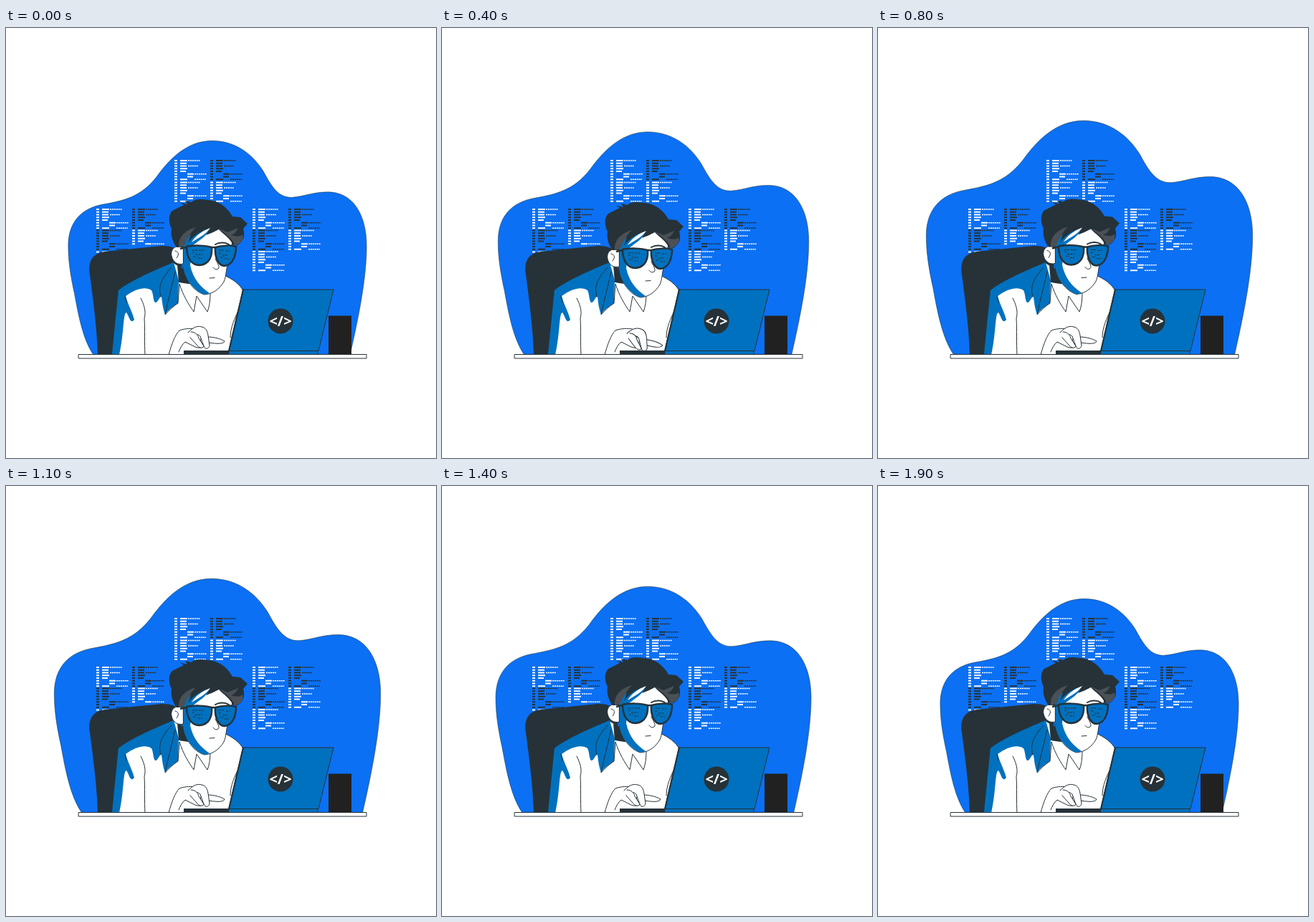
Animation, 600 px wide and 600 px high, one loop 2000 ms. Source, as an HTML page:

```html
<!DOCTYPE html>
<html lang="en">
<head>
<meta charset="utf-8">
<title>Coder at a laptop</title>
<style>
  html, body { margin: 0; width: 100%; height: 100%; overflow: hidden; background: #fff; }
  svg { display: block; width: 100%; height: 100%; }
  .dark { fill: #263238; }
  .blue { fill: #0071bf; }
  .white { fill: #fff; }
  .line { fill: none; }
  .ink { stroke: #263238; stroke-width: 1; stroke-linecap: round; stroke-linejoin: round; }
  .badge { font: bold 20px "Open Sans", sans-serif; fill: #fff; text-anchor: middle; }
</style>
</head>
<body>
<svg viewBox="0 0 600 600">
  <path id="blob" fill="#0b70f3" stroke="#263238" stroke-width=".5" d="M122 456C107 434 101 400 95.500 370C90 345 87 325 87 304C87 270 106 252 134 246.500C165 241 188 236 210 208C230 180 254 158 287 157.500C320 157.500 344 176 359 200C371 222 380 237 399 236.500C417 235 428 229 449 229C485 229 503 262 503 304C503 345 494 395 480 456Z"/>
  <g id="code"></g>

  <!-- chair -->
  <path class="dark" d="M128 456C127 420 122 382 117 344C114 323 122 313 142 311.500L212 304.500C226 303 236 305 244 314L246 345L160 372L148 456Z"/>

  <!-- shirt -->
  <path class="white ink" d="M148 456L157 366C180 351 210 338 234 328L262 345L304 345C316 350 327 358 331 367L314 456Z"/>
  <path class="blue" d="M148 456L157 366C170 355 200 341 234 327L241 352L240 384C232 389 225 395 222 400C219 392 218 384 217 375C214 374 212 384 208 383C205 380 206 372 203 366C195 360 180 364 167 374C170 386 176 395 179 407C173 414 172 402 168 397C163 398 165 425 158 456Z"/>
  <path class="dark" d="M239 331L250 338L262 362L241 355Z"/>
  <path class="white" d="M241 355L262 358L285 368L264 392Z"/>
  <path class="line ink" d="M231 334C216 350 212 362 216 375M236 340C231 362 225 385 222 400C227 394 234 388 240 384L242 357C247 373 255 386 262 396L266 374L281 396C284 388 285 380 285 368M194 456C193 440 194 420 193 405C196 395 192 385 188 377M313 432C313 418 319 405 326 391M166 374L168 383"/>

  <!-- hand -->
  <path class="white ink" d="M227 456C231 441 236 428 242 422C250 419 259 419 266 420L281 437C279 445 272 448 264 445L250 438C246 441 243 447 241 452"/>
  <g id="fingers" class="white ink">
    <path d="M273 431C286 430 299 433 305 437C304 441 295 441 283 439L271 441Z"/>
    <path d="M254 425C260 418 267 415 273 417C279 418 281 423 282 429L284 443C283 448 278 449 276 444L271 430C267 426 262 427 257 431"/>
    <path d="M258 424C264 424 268 428 269 433L276 444C274 448 269 446 266 442L257 432"/>
  </g>

  <g id="head">
    <!-- face -->
    <path class="white ink" d="M245 300L256 282L290 270L318 290L309 330C307 340 307 347 304 354C298 364 289 371 277 372C263 368 249 352 247 330Z"/>
    <path class="blue" d="M245 310L252 280H284C281 290 270 296 261 303L257 331C261 350 271 361 284 370C279 372 276 372 272 370C258 362 248 347 247 329Z"/>
    <!-- ear -->
    <path class="white ink" d="M247 307C238 301 229 308 231 318C233 327 240 331 247 329Z"/>
    <path class="line ink" d="M236 311C241 312 242 316 238 321"/>
    <!-- hair -->
    <path class="dark" d="M238 306C231 297 230 287 231 280C226 270 227 260 232 255L248 247L243 243.500L253 246L250 241L259 243C264 237 278 239 289 241C303 245 311 254 316 263L327 264L337 273L331 280C334 290 331 298 323 303L316 302C313 293 303 288 297 281C291 284 285 287 279 289L284 280C272 283 262 289 254 300L258 288C252 292 249 299 247 306Z"/>
    <path fill="#4b5056" d="M241 306C240 294 247 283 265 278C258 285 253 293 249 304ZM297 280L309 285L324 279C321 285 318 288 314 289C321 291 326 292 330 288C332 296 327 302 319 303C316 293 306 287 297 280Z"/>
    <path class="white" d="M259 299C264 290 274 283 285 279C280 287 270 292 259 299Z"/>
    <!-- features -->
    <path class="line ink" style="stroke-width:2" d="M292 302C298 298.500 306 299 311 302"/>
    <path class="line ink" d="M292 322C295 328 299 334 296 336C293 338 290 336 289 334M284 349L291 348.5"/>
    <!-- glasses -->
    <g class="blue" stroke="#263238" stroke-width="2.500" stroke-linejoin="round">
      <path d="M252 305C262 303 278 303 287 306C288 318 284 330 270 331C257 331 252 318 252 305Z"/>
      <path d="M292 306C302 303 314 303 321 305C321 318 316 331 305 332C296 332 291 319 292 306Z"/>
      <path class="line" d="M243 308L252 306M286 307Q289 305 293 307"/>
    </g>
    <path class="line" stroke="#263238" stroke-dasharray="3 1" d="M260 310h7M269 310h7M260 313h4M264 316h10M261 319h5M268 321h6M297 310h7M307 311h6M297 314h4M302 317h7M299 320h5M305 322h6"/>
  </g>

  <!-- laptop, box, desk -->
  <path class="dark" d="M248 450H314V456H248Z"/>
  <path class="blue ink" d="M311 450.500H435V456H311Z"/>
  <path class="blue ink" d="M331 365H457L436 450.500H311Z"/>
  <path class="line ink" style="stroke-width:2" d="M331 365L311 451"/>
  <circle class="dark" cx="383" cy="409" r="17.5"/>
  <text class="badge" x="383" y="416">&lt;/&gt;</text>
  <path fill="#212121" d="M450 401.500H482V456H450Z"/>
  <path class="white ink" d="M101.500 455.500H503V461H101.500Z"/>
</svg>
<script>
const LOOP = 2000, STEP = 100;
const part = id => document.getElementById(id);

// Each row: bar start, bar width, dash start, dash length
const ROWS = [[8, 10, 19, 17], [8, 9], [8, 9, 19, 14], [8, 10], [8, 8],
              [18, 9, 28, 17], [18, 8], [8, 10, 28, 16]];

function codeBlock(x, y, color, rows = ROWS.length) {
  let bars = '', dashes = '';
  ROWS.slice(0, rows).forEach(([bar, width, dash, length], i) => {
    const top = y + i * 3.75;
    bars += `M${x} ${top}h4M${x + bar} ${top}h${width}`;
    if (dash) dashes += `M${x + dash} ${top}h${length}`;
  });
  return `<g fill="none" stroke="${color}"><path stroke-width="2" d="${bars}"/>
    <path stroke-width="1.300" stroke-dasharray="2.200 .7" d="${dashes}"/></g>`;
}

const LIGHT = '#f4f8ff', DARK = '#263238';
part('code').innerHTML = [
  [235, 185, LIGHT], [235, 215.5, LIGHT], [285, 185, DARK], [285, 215.5, LIGHT],
  [126, 253, LIGHT], [126, 282.5, DARK], [126, 312.5, LIGHT, 1],
  [176, 253, DARK], [176, 282.5, LIGHT, 6],
  [344, 253, LIGHT], [344, 282.5, DARK], [344, 312, LIGHT],
  [394, 253, DARK], [394, 282.5, LIGHT]
].map(block => codeBlock(...block)).join('');

// Eased value between [time, value] keys
function ease(keys, t) {
  const i = keys.findIndex(([time]) => time > t);
  const [t0, a] = keys[i - 1], [t1, b] = keys[i];
  return a + (b - a) * (1 - Math.cos(Math.PI * (t - t0) / (t1 - t0))) / 2;
}

const NOD = [[0, 0], [200, 0], [450, 4], [650, -.5], [850, -.5], [1150, 3],
             [1450, 0], [1650, -4.5], [1950, 0], [2001, 0]];
const PRESS = [[0, 0], [150, 0], [450, 1], [800, 0], [2001, 0]];

function draw(now) {
  const t = Math.floor(now % LOOP / STEP) * STEP + STEP / 2;
  const scale = 1.05 - .05 * Math.cos(2 * Math.PI * t / LOOP);
  const press = ease(PRESS, t);
  part('blob').setAttribute('transform', `translate(295 456) scale(${scale}) translate(-295 -456)`);
  part('head').setAttribute('transform', `translate(0 ${ease(NOD, t)})`);
  part('fingers').setAttribute('transform', `translate(${4 * press} ${2 * press}) rotate(${5 * press} 262 425)`);
}

const start = performance.now();
function frame() {
  draw(performance.now() - start);
  requestAnimationFrame(frame);
}
frame();
</script>
</body>
</html>
```
